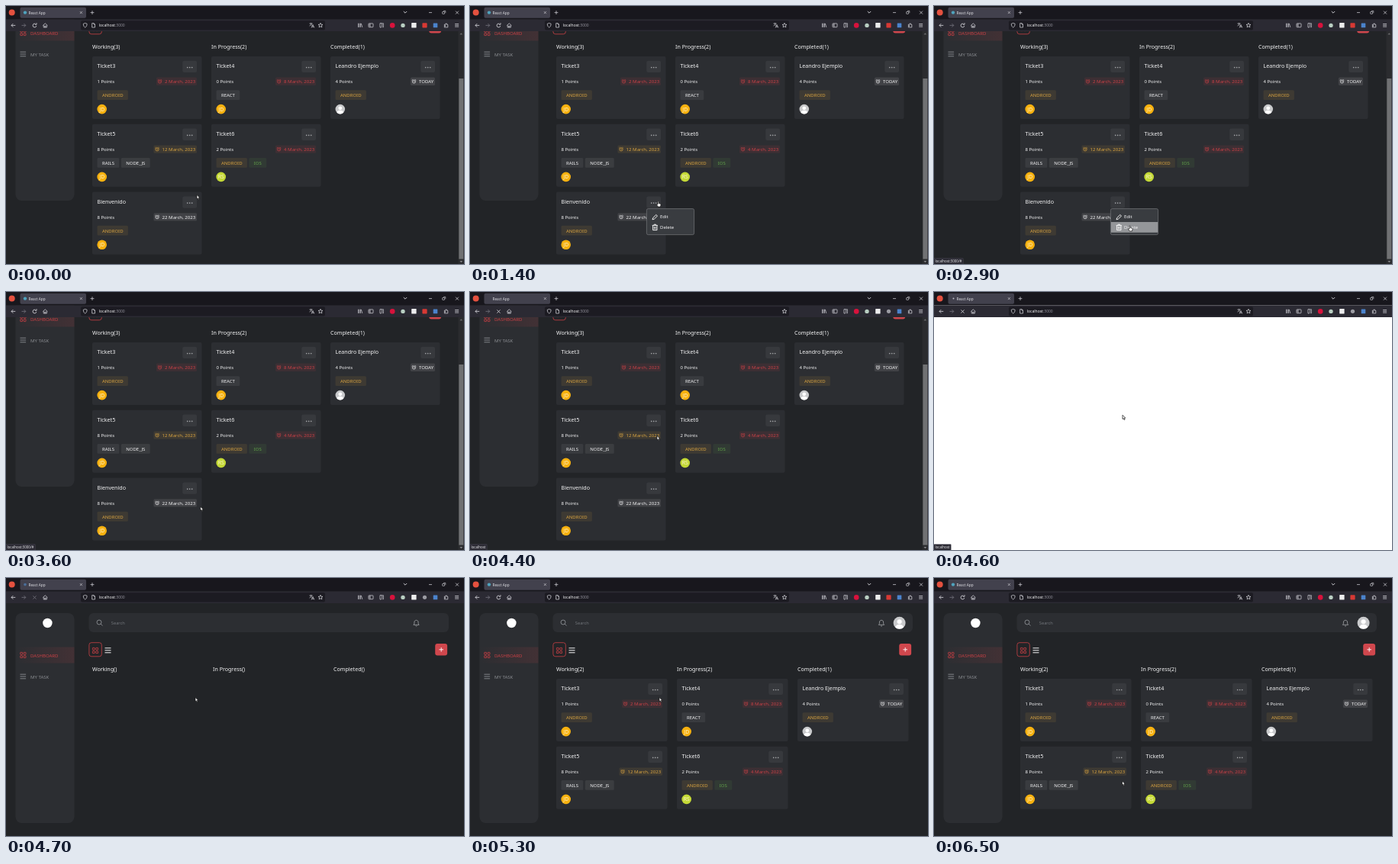
Write an HTML page with a canvas that moves like this. It is 600x338 px and loops after 6600 ms.

```html
<!DOCTYPE html>
<html lang="en">
<head>
<meta charset="utf-8">
<title>Task board</title>
<style>
html, body { margin: 0; width: 100%; height: 100%; overflow: hidden; background: #222427; }
canvas { display: block; width: 600px; height: 338px; }
</style>
</head>
<body>
<canvas id="stage" width="600" height="338"></canvas>
<script>
const ctx = document.getElementById('stage').getContext('2d');
const LOOP = 6600, STEP = 100;
const FONT = '"Noto Sans", "Open Sans", sans-serif';
const RED = '#c94146', GOLD = '#d9a441', GREEN = '#62a34a', WHITE = '#f4f4f5', GREY = '#8b8e92';
const CARD = '#2c2e32';

const TIME = { menuOpen: 1400, menuClose: 3300, statusOff: 3700, reload: 4400, blank: 4500,
  board: 4700, cards: 4900, loaded: 5000 };

// time, x, y of the pointer tip
const POINTER = [[0, 250, 247.5], [800, 250, 248], [1000, 246, 256], [1700, 246, 256], [1900, 246, 239],
  [2200, 246, 239], [2600, 256, 285], [2900, 256, 288], [3500, 256, 288], [4200, 247, 240],
  [4400, 245, 188.5], [4500, 246, 166], [4700, 248, 156.5], [5600, 248, 156.5], [5700, 254, 147],
  [5800, 284, 164], [5900, 295, 200], [6000, 286, 250], [6100, 264, 288], [6200, 238, 302],
  [6300, 217, 301], [6500, 246.5, 266]];

const COLUMNS = [
  ['Working', [
    ['Ticket3', 1, '2 March, 2023', RED, ['ANDROID'], 'JD'],
    ['Ticket5', 8, '12 March, 2023', GOLD, ['RAILS', 'NODE_JS'], 'JD'],
    ['Bienvenido', 8, '22 March, 2023', WHITE, ['ANDROID'], 'JD']]],
  ['In Progress', [
    ['Ticket4', 0, '8 March, 2023', RED, ['REACT'], 'JD'],
    ['Ticket6', 2, '4 March, 2023', RED, ['ANDROID', 'IOS'], 'RS']]],
  ['Completed', [
    ['Leandro Ejemplo', 4, 'TODAY', WHITE, ['ANDROID'], '']]]
];
const TAG_COLORS = { ANDROID: GOLD, IOS: GREEN };

function box(x, y, w, h, color, r = 0) {
  ctx.fillStyle = color;
  ctx.beginPath();
  ctx.roundRect(x, y, w, h, r);
  ctx.fill();
}
function frame(x, y, w, h, color, r = 0, width = 0.8) {
  ctx.strokeStyle = color;
  ctx.lineWidth = width;
  ctx.beginPath();
  ctx.roundRect(x, y, w, h, r);
  ctx.stroke();
}
function tint(x, y, w, h, color, r, alpha = 0.1) {
  ctx.globalAlpha = alpha;
  box(x, y, w, h, color, r);
  ctx.globalAlpha = 1;
}
function disc(x, y, r, color) {
  ctx.fillStyle = color;
  ctx.beginPath();
  ctx.arc(x, y, r, 0, Math.PI * 2);
  ctx.fill();
}
function ring(x, y, r, color, from = 0, to = Math.PI * 2, width = 0.8) {
  ctx.strokeStyle = color;
  ctx.lineWidth = width;
  ctx.beginPath();
  ctx.arc(x, y, r, from, to);
  ctx.stroke();
}
// Strokes (or fills) an SVG path placed at x, y
function path(x, y, d, color, width = 0.8, fill) {
  const shape = new Path2D(d);
  ctx.save();
  ctx.translate(x, y);
  if (fill) { ctx.fillStyle = fill; ctx.fill(shape); }
  ctx.strokeStyle = color;
  ctx.lineWidth = width;
  ctx.stroke(shape);
  ctx.restore();
}
function text(str, x, y, size, color = WHITE, align = 'left') {
  ctx.font = `${size}px ${FONT}`;
  ctx.textAlign = align;
  ctx.fillStyle = color;
  ctx.fillText(str, x, y);
}
function textWidth(str, size) {
  ctx.font = `${size}px ${FONT}`;
  return ctx.measureText(str).width;
}
const cross = (x, y, s, color, w) => path(x, y, `M${-s} ${-s}L${s} ${s}M${s} ${-s}L${-s} ${s}`, color, w);
const plus = (x, y, s, color, w) => path(x, y, `M${-s} 0H${s}M0 ${-s}V${s}`, color, w);
const lines = (x, y, s, gap, color, w) =>
  path(x, y, `M${-s} ${-gap}H${s}M${-s} 0H${s}M${-s} ${gap}H${s}`, color, w);

function gridIcon(x, y, color) {
  for (const dx of [-3.6, 0.8]) for (const dy of [-3.6, 0.8]) frame(x + dx, y + dy, 2.8, 2.8, color, 0.3, 0.8);
}
function clock(x, y, color) {
  ring(x, y, 2.1, color, 0, Math.PI * 2, 0.7);
  path(x, y, 'M0 -1.2V.2H1M-2.8 -1.6L-1.5 -2.7M2.8 -1.6L1.5 -2.7', color, 0.6);
}
function person(x, y, r) {
  disc(x, y, r, '#c9cacc');
  ctx.save();
  ctx.beginPath();
  ctx.arc(x, y, r, 0, Math.PI * 2);
  ctx.clip();
  disc(x, y - r * 0.2, r * 0.38, '#fff');
  ctx.fillStyle = '#fff';
  ctx.beginPath();
  ctx.ellipse(x, y + r * 0.8, r * 0.68, r * 0.55, 0, 0, Math.PI * 2);
  ctx.fill();
  ctx.restore();
}

function drawBrowser(t) {
  const loading = t >= TIME.reload && t < TIME.loaded;
  const ink = '#dddde2';
  box(0, 0, 600, 17.5, '#18171d');
  box(0, 17.5, 600, 15.5, '#2b2a33');
  disc(7.7, 8.4, 4, '#e4513f');
  box(18.5, 1.8, 86.5, 14, '#42414d', 2);
  if (!loading) disc(25, 8.6, 2.2, '#4fa3bd');
  else if (t >= TIME.board) disc(25, 8.6, 1.8, '#4a6f9a');
  else if (t >= TIME.blank) disc(25.5, 8.6, 1, '#c0c0c8');
  text('React App', 29.5, 10.6, 4.7, ink);
  cross(98.4, 8.6, 1.5, ink, 0.6);
  plus(113, 8.6, 2.4, ink, 0.7);
  path(523, 8, 'M-2.2 -1L0 1.2L2.2 -1', ink, 0.9);
  path(556, 8.6, 'M-2 0H2', ink, 0.7);
  frame(571.7, 7.5, 2.8, 2.8, ink, 0.3, 0.6);
  path(573, 6.4, 'M0 0H2.8V2.8', ink, 0.6);
  cross(591, 8.6, 2, ink, 0.7);

  const arrow = 'M2.8 0H-2.5M-.2 -2.3L-2.5 0L-.2 2.3';
  path(9.5, 25.4, arrow, ink, 0.8);
  ctx.save();
  ctx.translate(23.3, 25.4);
  ctx.scale(-1, 1);
  path(0, 0, arrow, '#76757f', 0.8);
  ctx.restore();
  if (loading) cross(37.5, 25.5, 2.1, t < TIME.board ? ink : '#76757f', 0.8);
  else {
    ring(37.5, 25.5, 2.4, ink, 0.2, 5.2);
    path(40, 23, 'M0 -.8V1.3H-2.1', ink, 0.8);
  }
  path(51.3, 25.3, 'M-3 .2L0 -2.5L3 .2M-2.1 -.3V2.7H2.1V-.3M-.5 2.7V.8H.5V2.7', ink, 0.7);

  box(98, 19.2, 320, 12.3, '#1c1b22', 2);
  path(103.7, 25.2, 'M0 -2.8L2.4 -1.9C2.4 .6 1.6 2 0 2.9C-1.6 2 -2.4 .6 -2.4 -1.9Z', ink, 0.7);
  path(114.6, 25.3, 'M-1.9 -2.7H.5L1.9 -1.2V2.7H-1.9ZM.5 -2.7V-1.2H1.9', ink, 0.7);
  text('localhost', 121.8, 27.2, 5, WHITE);
  text(':3000', 121.8 + textWidth('localhost', 5), 27.2, 5, '#92919b');
  if (t < TIME.reload || t >= TIME.blank) {
    path(399.5, 24.5, 'M-2 -1.6H2M0 -2.5V-1.6M1.3 -1.6C.8 0 -.5 1 -2 1.5M-1.2 -1.2L1 1.2', ink, 0.6);
    path(402, 26.4, 'M-1.8 2L0 -1.9L1.8 2M-1.1 .8H1.1', ink, 0.7);
  }
  path(412, 25.3, 'M0 -3L.9 -1H3L1.4 .4L1.9 2.6L0 1.4L-1.9 2.6L-1.4 .4L-3 -1H-.9Z', ink, 0.7);

  path(464, 25.3, 'M-2.5 -2.6V2.6M-1 -2.6V2.6M.4 -2.6V2.6M1.3 -2.4L2.8 2.6', ink, 0.7);
  frame(475, 22.9, 6, 4.8, ink, 0.6, 0.7);
  path(477, 25.3, 'M0 -2.2V2.2M-1.4 -1H-.5M-1.4 .3H-.5', ink, 0.7);
  path(492, 25.3, 'M-2 -2.7H.6V1.2L-.6 2.7H-2ZM1.3 -2.6H2.4V2.4H1.3', ink, 0.7);
  disc(506.2, 25.4, 3.3, '#d8123c');
  disc(520, 25.4, 2.7, '#b9cfc2');
  box(531.2, 22.1, 6.4, 6.4, '#ededee', 0.4);
  if (loading) disc(548.5, 25.3, 2.6, '#9b9ba2');
  else box(545.4, 22.3, 6.2, 6.2, '#d83934', 0.8);
  box(559.7, 22.5, 5.6, 5.8, '#4b83cc', 0.5);
  path(576.6, 25.5, 'M-2.3 -1.2H-.8V-2.4H.9V-1.2H2.2V2.4H-2.3V1H-1V.1H-2.3Z', ink, 0.7);
  lines(590.6, 25.3, 2.5, 1.8, ink, 0.7);
}

function drawSidebar(dy) {
  box(12.5, 46 + dy, 77, 275, CARD, 8);
  disc(54.4, 59 + dy, 6.2, '#fff');
  const glow = ctx.createLinearGradient(12.5, 0, 89.5, 0);
  glow.addColorStop(0, 'rgba(201,65,70,0)');
  glow.addColorStop(1, 'rgba(201,65,70,.14)');
  box(12.5, 90.5 + dy, 77, 21, glow);
  gridIcon(22.4, 101 + dy, RED);
  text('DASHBOARD', 32, 103.5 + dy, 6.05, RED);
  lines(22.3, 129 + dy, 3.8, 2.8, GREY, 0.9);
  text('MY TASK', 32, 131.6 + dy, 6.05, GREY);
}

function drawTopBar(width, dy, t) {
  const right = width - 20;
  const loaded = t < TIME.reload || t >= TIME.loaded;
  box(108.5, 46 + dy, right - 108.5, 25, CARD, 6);
  ring(122, 58 + dy, 3, GREY, 0, Math.PI * 2, 0.9);
  path(124.2, 60.2 + dy, 'M0 0L2.3 2.3', GREY, 0.9);
  text('Search', 137.8, 61.2 + dy, 5.7, '#71747a');
  path(loaded ? 539 : 537.5, 59 + dy,
    'M-3.6 2.4H3.6L2.6 .9V-1C2.6 -4.6 -2.6 -4.6 -2.6 -1V.9ZM-1 3.6C-.6 4.3 .6 4.3 1 3.6', '#a1a4a8', 0.8);
  if (loaded) person(right - 17.4, 58.8 + dy, 8);
  frame(108.9, 84.7 + dy, 16.4, 18.1, RED, 3);
  gridIcon(117, 95 + dy, RED);
  lines(133.5, 94.8 + dy, 4, 3, WHITE, 1);
  box(right - 17.8, 86 + dy, 15.9, 15.6, '#d0474d', 3);
  plus(right - 9.8, 93.8 + dy, 2.8, '#fff', 0.9);
}

function drawCard([title, points, date, dateColor, tags, initials], x, y, w) {
  const right = x + w - 6.5;
  box(x, y, w, 82, CARD, 2);
  text(title, x + 6.5, y + 15.4, 7.15);
  box(right - 18.7, y + 5.8, 18.7, 15.3, '#37393d', 2);
  for (const dx of [-3, 0, 3]) disc(right - 9.3 + dx, y + 14.5, 0.85, '#a0a2a5');
  text(`${points} Points`, x + 6.5, y + 35, 6);

  const dateWidth = textWidth(date, 6.1);
  tint(right - dateWidth - 12.8, y + 27.6, dateWidth + 12.8, 10.4, dateColor, 1.5);
  clock(right - dateWidth - 8.2, y + 33, dateColor);
  text(date, right - dateWidth - 1.7, y + 35.1, 6.1, dateColor);

  let tagX = x + 6.5;
  for (const tag of tags) {
    const color = TAG_COLORS[tag] || WHITE, width = textWidth(tag, 6) + 12.8;
    tint(tagX, y + 44.2, width, 12.8, color, 1.5, color === WHITE ? 0.07 : 0.1);
    text(tag, tagX + 6.4, y + 52.9, 6, color);
    tagX += width + 2.5;
  }
  if (!initials) return person(x + 12.8, y + 69.1, 6.3);
  disc(x + 12.7, y + 69.1, 6.3, initials === 'JD' ? '#f7b10f' : '#c4d936');
  text(initials, x + 12.7, y + 71.6, 6.8, '#fff4d2', 'center');
}

function drawColumns(width, dy, t) {
  const cardWidth = width < 600 ? 143.5 : 145.5;
  const reloaded = t >= TIME.board, ready = !reloaded || t >= TIME.cards;
  COLUMNS.forEach(([name, all], i) => {
    const x = 113 + i * (width < 600 ? 156 : 158);
    const cards = reloaded ? all.slice(0, 2) : all;
    text(`${name}(${ready ? cards.length : ''})`, x, 122 + dy, 7.1);
    if (ready) cards.forEach((card, row) => drawCard(card, x, 132 + dy + row * 88.8, cardWidth));
  });
}

function drawScrollbar() {
  box(592.5, 33, 7.5, 305, '#2b2c2f');
  box(593.3, 95, 6, 236.5, '#707173');
  path(596.3, 36.4, 'M-1.5 .8L0 -.8L1.5 .8Z', '#707173', 0.3, '#707173');
  path(596.3, 335, 'M-1.5 -.8L0 .8L1.5 -.8Z', '#a0a0a2', 0.3, '#a0a0a2');
}

function drawMenu(hover) {
  box(231.4, 265.6, 62.2, 34, '#393c40', 2);
  if (hover >= 0) box(231.8, 269.2 + hover * 13.8, 61.5, 13.8, '#949699');
  frame(231.4, 265.6, 62.2, 34, '#76787b', 2, 0.7);
  path(242.3, 276.5, 'M-3.3 3.3L-2.6 1L1.5 -3L3.2 -1.4L-1 2.6Z', '#fff', 0.9);
  path(242.3, 290, 'M-3.6 -2.6H3.6M-1.2 -2.8V-3.8H1.2V-2.8M-2.7 -2.4V3.6H2.7V-2.4M-.9 -1V2.3M.9 -1V2.3', '#fff', 0.9);
  text('Edit', 249, 278.2, 6);
  text('Delete', 249, 291.8, 6);
}

function drawStatus(label) {
  const width = textWidth(label, 4.5) + 3.2;
  box(0, 330.6, width, 7.4, '#2b2a33');
  frame(-1, 330.6, width + 1, 8.4, '#4a4954', 0.5, 0.5);
  text(label, 1.4, 336.1, 4.5, '#e6e6ea');
}

function pointerAt(t) {
  const next = POINTER.findIndex(key => key[0] > t);
  if (next < 0) return POINTER[POINTER.length - 1].slice(1);
  const [t0, x0, y0] = POINTER[next - 1], [t1, x1, y1] = POINTER[next];
  const k = (t - t0) / (t1 - t0);
  return [x0 + (x1 - x0) * k, y0 + (y1 - y0) * k];
}

function drawPointer(x, y, hand) {
  const shape = hand
    ? 'M0 .6C0 -.4 1.3 -.4 1.3 .6V2.6L3.6 3.2C4.3 3.5 4 5.4 3.3 7H.4L-1.5 4.4C-1.7 3.6 -.8 3.4 0 4.2Z'
    : 'M0 0V5.2L1.2 4.2L2.1 6.2L3.1 5.8L2.3 3.8H3.8Z';
  path(x, y, shape, '#111', 0.7, '#fff');
}

function draw(t) {
  const [x, y] = pointerAt(t);
  const menu = t >= TIME.menuOpen && t < TIME.menuClose;
  const hover = menu && y >= 269.2 && y < 297 ? Math.floor((y - 269.2) / 13.8) : -1;
  const blank = t >= TIME.blank && t < TIME.board;

  box(0, 0, 600, 338, blank ? '#fff' : '#222427');
  if (!blank) {
    const scrolled = t < TIME.blank;
    const width = scrolled ? 592 : 600, dy = scrolled ? -66 : 0;
    drawSidebar(dy);
    drawTopBar(width, dy, t);
    drawColumns(width, dy, t);
    if (scrolled) drawScrollbar();
    if (menu) drawMenu(hover);
  }
  drawBrowser(t);
  if (hover >= 0 || (t >= TIME.menuClose && t < TIME.statusOff)) drawStatus('localhost:3000/#');
  if (t >= TIME.reload && t < TIME.board) drawStatus('localhost');
  drawPointer(x, y, hover >= 0 || (t >= 1200 && t < 1800));
}

const start = performance.now();
function tick() {
  const t = (performance.now() - start) % LOOP;
  draw(Math.floor(t / STEP) * STEP);
  requestAnimationFrame(tick);
}
tick();
</script>
</body>
</html>
```
